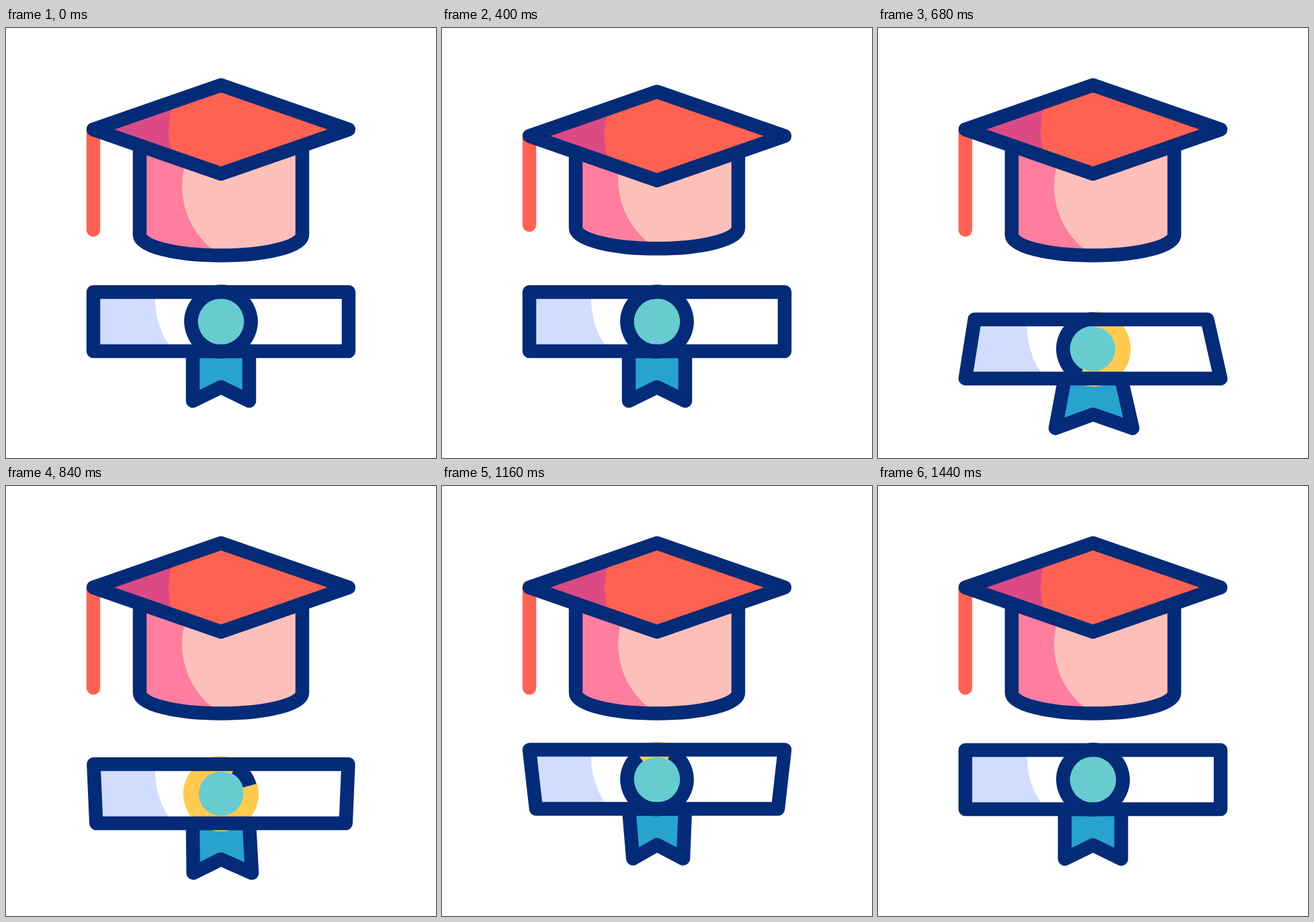
An HTML page with a canvas that plays this animation: 640 px wide and 640 px high, repeating every 1.48 s.

```html
<!DOCTYPE html>
<html lang="en">
<head>
<meta charset="utf-8">
<title>Graduation</title>
<style>
  html, body { margin: 0; width: 100%; height: 100%; overflow: hidden; background: #fff; }
  canvas { display: block; }
</style>
</head>
<body>
<canvas id="stage" width="640" height="640"></canvas>
<script>
const ctx = document.getElementById('stage').getContext('2d');
const LOOP = 1480, STEP = 40, HOLD = 120, LINE = 20.5;
const NAVY = '#042b77', CORAL = '#ff6252', PLUM = '#dc4a85', PINK = '#ff7d9f',
  BLUSH = '#fdbfba', LAVENDER = '#d2dcfd', TEAL = '#67cccf', BLUE = '#28a2ce', YELLOW = '#ffcb4f';

// Keys are [time, value] pairs joined by sine easing.
const MOTION = {
  board: [[100, 0], [270, -47], [430, 15], [660, 0]],
  body: [[100, 0], [290, -39], [470, 4], [660, 0]],
  tassel: [[100, 0], [250, -59], [470, 8], [660, 0]],
  scroll: [[420, 0], [720, 42.5], [1040, -27], [1255, 18], [1440, 0]],
  topLeft: [[440, 0], [670, 14], [860, 0]],
  topRight: [[440, 0], [670, -20], [860, 0]],
  bottom: [[760, 0], [1000, 17], [1360, 0]],
  tailLeft: [[440, 0], [670, -14], [980, 11.5], [1360, 0]],
  tailRight: [[440, 0], [670, 17], [980, -5.5], [1360, 0]]
};

function valueAt(keys, t) {
  if (t <= keys[0][0]) return keys[0][1];
  for (let i = 1; i < keys.length; i++) {
    const [t0, a] = keys[i - 1], [t1, b] = keys[i];
    if (t < t1) return a + (b - a) * (1 - Math.cos(Math.PI * (t - t0) / (t1 - t0))) / 2;
  }
  return keys[keys.length - 1][1];
}

function polygon(points) {
  const path = new Path2D();
  points.forEach(([x, y]) => path.lineTo(x, y));
  path.closePath();
  return path;
}

function fill(path, color) {
  ctx.fillStyle = color;
  ctx.fill(path);
}

function stroke(path, color = NAVY, width = LINE) {
  ctx.strokeStyle = color;
  ctx.lineWidth = width;
  ctx.stroke(path);
}

function disc(x, y, r) {
  const path = new Path2D();
  path.arc(x, y, r, 0, Math.PI * 2);
  return path;
}

// Fills a shape in its shade colour, with a lit disc clipped inside it.
function shaded(path, shade, light, x, y, r) {
  fill(path, shade);
  ctx.save();
  ctx.clip(path);
  const lit = disc(x, y, r);
  lit.rect(x, 0, 640, 640);
  fill(lit, light);
  ctx.restore();
}

function drawCap(pose) {
  const top = 151 + pose.board, base = 308 + pose.body;

  stroke(new Path2D(`M130 ${top}V${300.5 + pose.tassel}`), CORAL);

  const body = new Path2D(`M199 ${top + 24}V${base}
    C199 ${base + 17} 253 ${base + 30.5} 320 ${base + 30.5}
    S441 ${base + 17} 441 ${base}V${top + 24}`);
  shaded(body, PINK, BLUSH, 384, 235 + pose.body, 122);
  stroke(body);

  const board = polygon([[130, top], [320, top - 66], [510, top], [320, top + 66]]);
  shaded(board, PLUM, CORAL, 364, top, 122);
  stroke(board);
}

// Navy part of the seal's ring, in degrees clockwise from its seam.
function ringSpan(t) {
  if (t < 540) return [0, 360];
  if (t < 780) {
    const u = (t - 540) / 240;
    return [305 * u, 360 - 43 * u];
  }
  return [0, Math.min(360, 360 * (t - 780) / 465)];
}

function ringArc(from, to) {
  const path = new Path2D(), rad = d => (d - 62) * Math.PI / 180;
  path.arc(320, 437, 44.5, rad(from), rad(to));
  return path;
}

function drawDiploma(pose, t) {
  ctx.save();
  ctx.translate(0, pose.scroll);

  const ribbon = polygon([[278, 481], [278 + pose.tailLeft, 555], [320, 534.5],
    [362 + pose.tailRight, 555], [362, 481]]);
  fill(ribbon, BLUE);
  stroke(ribbon);

  const sheet = polygon([[130 + pose.topLeft, 393], [510 + pose.topRight, 393],
    [510 - pose.bottom, 481], [130 + pose.bottom, 481]]);
  shaded(sheet, LAVENDER, '#fff', 341, 405, 119);

  const [from, to] = ringSpan(t);
  fill(disc(320, 437, 35), TEAL);
  ctx.lineCap = 'butt';
  if (to - from < 360) stroke(ringArc(to, from + 360), YELLOW, 23);
  stroke(sheet);
  if (to > from) stroke(ringArc(from, to));
  ctx.lineCap = 'round';
  ctx.restore();
}

function draw(now) {
  let t = Math.floor(now % LOOP / STEP) * STEP;
  if (t < HOLD) t = 0;
  const pose = {};
  for (const part in MOTION) pose[part] = valueAt(MOTION[part], t);

  ctx.fillStyle = '#fff';
  ctx.fillRect(0, 0, 640, 640);
  ctx.lineCap = ctx.lineJoin = 'round';
  drawCap(pose);
  drawDiploma(pose, t);
}

const start = performance.now();
function tick() {
  draw(performance.now() - start);
  requestAnimationFrame(tick);
}
tick();
</script>
</body>
</html>
```
